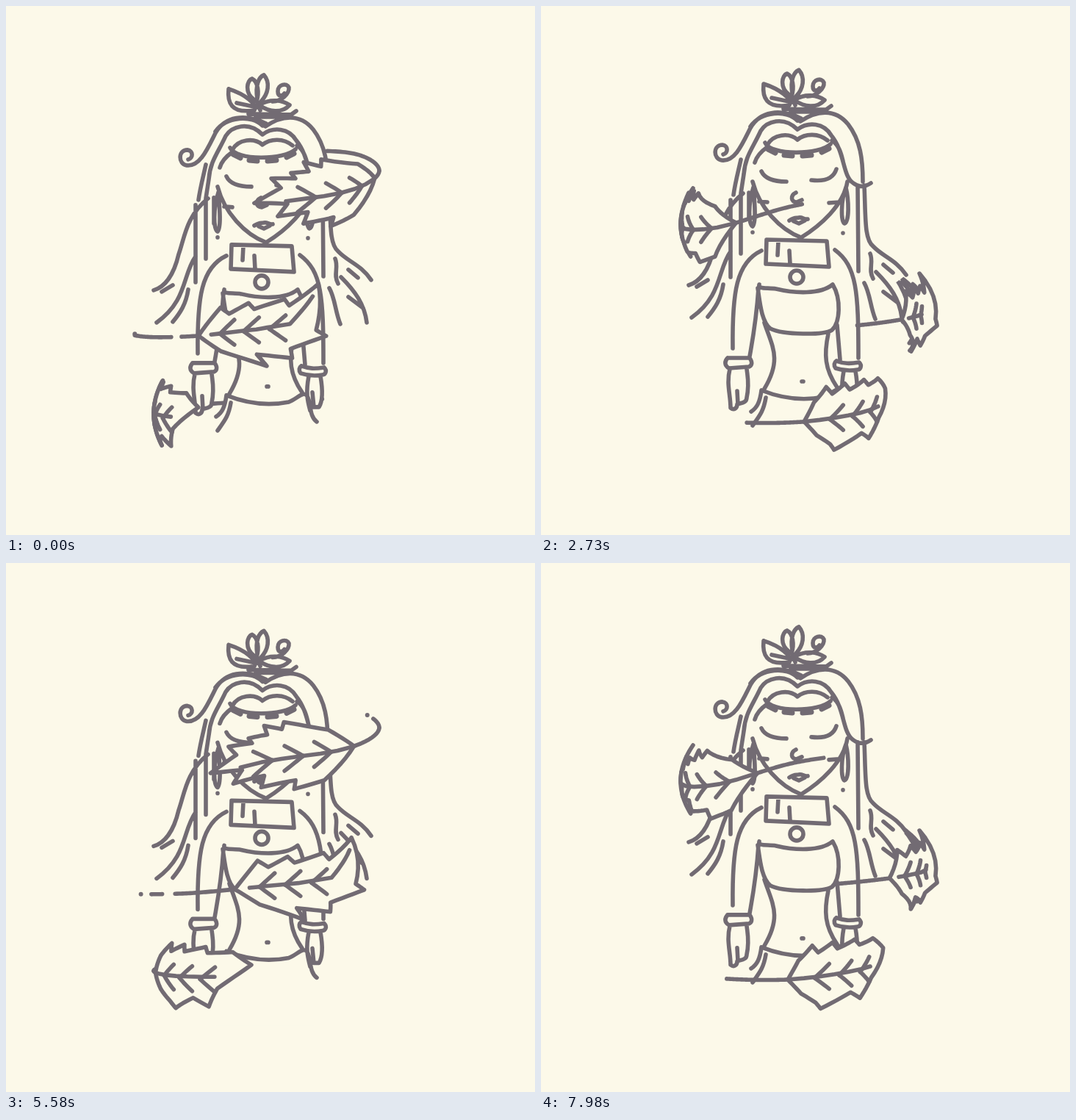
Animation of 720x720 px, one loop 8 s. Source, as an HTML page with a canvas:

```html
<!DOCTYPE html>
<html lang="en">
<head>
<meta charset="utf-8">
<title>Leaves around a figure</title>
<style>
html, body { margin: 0; width: 100%; height: 100%; overflow: hidden; background: #fcf9e9; }
canvas { display: block; width: 720px; height: 720px; }
</style>
</head>
<body>
<canvas id="stage" width="720" height="720"></canvas>
<script>
const ctx = document.getElementById('stage').getContext('2d');
const PAPER = '#fcf9e9', INK = '#726b73';
const LOOP = 8000, TURN = 1770, STEP = 30, RAD = Math.PI / 180;
const clamp = (x, lo, hi) => Math.min(hi, Math.max(lo, x));

const silhouette = new Path2D(`M350 142C300 140 280 170 268 215L262 258C240 290 238 330 225 370
  L236 404L256 365L261 400L261 470L252 484L254 500L258 548L280 536L284 495L290 470L305 520L300 526
  L290 570L285 625L420 625L412 543L427 540L431 498L437 490L432 470L432 405L440 385L452 420L466 390
  L497 367L455 330L440 240C440 190 420 140 350 142Z`);

const flower = `M303 107C301 125 306 141 338 136C343 128 325 114 303 107
  M338 122C324 112 328 95 335 93C343 97 345 112 341 124M342 120C339 102 344 91 351 88C360 98 357 114 347 124
  M346 128C360 120 376 122 386 129C375 141 358 138 346 130M363 124C375 124 386 113 385 105C382 98 370 101 370 110
  C370 118 376 117 379 113M314 126L342 132M341 122L346 136M330 141L388 142L395 137M340 145L374 145`;

const hair = `M354 154C325 140 298 144 285 167C274 189 264 213 246 211C234 209 234 190 247 190C255 191 255 201 248 203
  M335 148L353 158C375 143 400 140 418 162C435 184 438 210 438 240
  M349 169C330 150 307 158 299 171C288 195 278 205 276 230L272 256
  M349 169C364 158 385 160 395 177C414 200 410 232 425 242C434 249 443 246 449 242
  M349 183C338 173 316 175 308 190M349 183C360 174 378 174 390 184M396 184C406 190 409 204 411 212
  M272 210C268 228 264 243 262 258M285 165C300 144 335 142 349 157
  M275 256C245 280 243 310 235 332C228 362 215 377 201 381M227 374L212 383
  M258 265L258 370M272 256L272 338M258 335C240 360 247 395 205 425M248 380C245 400 237 412 227 424
  M431 245L432 362M440 245C442 290 440 318 452 328C465 342 483 346 497 367M448 338C453 350 445 360 452 372
  M466 353L479 364M456 363C475 382 488 400 491 425M466 390L486 405M440 378C448 392 448 410 455 427`;

const face = `M305 187C313 205 379 204 394 189M308 193C298 200 293 207 291 214M288 240C297 275 325 305 354 316
  C380 300 412 272 417 240M300 226C305 237 319 240 334 240M368 238C385 240 398 236 402 223
  M347 255C339 259 340 268 348 268L355 265M338 293C345 288 348 290 351 289C356 288 358 292 363 291
  M344 294L351 297L359 293M297 267L308 268M392 269L406 268M283 255L283 290
  M289 248C282 270 282 298 288 301C293 296 291 270 289 248M415 248C408 265 408 295 413 297C420 295 419 265 415 248
  M288 309L288 309M411 310L411 310`;

const torso = `M307 319L389 321L392 356L306 352ZM323 321L322 340M338 334L339 352
  M357 370A9 9 0 1 1 339 370A9 9 0 1 1 357 370
  M300 334C266 350 260 390 261 467M296 385C293 430 288 455 284 478M400 333C430 355 432 390 432 480M403 435L407 482
  M297 380C295 387 308 384 320 386C345 392 380 394 397 380C409 400 407 432 396 442C385 449 330 449 312 440
  C300 430 298 405 295 385M304 432C315 465 328 482 304 522M391 447C385 475 386 495 403 520
  M355 512L357 512M300 524C320 532 350 540 385 533C396 529 405 517 410 525C416 535 412 552 423 560
  M306 534C303 552 298 558 288 572M300 524C298 540 294 548 286 553
  M254 480L284 480C289 487 286 491 283 492L256 494C249 490 250 484 254 480
  M402 484C413 488 420 488 433 486C438 491 434 496 431 496C420 498 410 497 401 494C398 490 399 486 402 484
  M257 495C252 515 258 530 258 548C263 552 267 548 267 543C273 541 280 541 280 534C284 515 281 505 280 495M267 525L268 543
  M412 498C408 520 410 530 414 545M428 498C431 515 432 530 426 540L419 540L417 520`;

const figure = new Path2D(flower + hair + face + torso);
const band = new Path2D('M309 196L319 201M331 204L342 205M356 205L368 204M382 200L392 195');

// keys: [ms, stalk joint angle]; level: ring height every 45deg from -90;
// outline: leaf edge as [along, across] from joint round the tip and back.
const veins = [.2, .4, .6].flatMap(u => [[[u, 0], [u + .12, -17]], [[u, 0], [u + .12, 17]]]);
const leaves = [
  {
    cx: 349, r: 159, flare: 0, dir: -1, len: 78, rest: -20, stem: 33, grow: 46, dot: true,
    keys: [[0, 74], [120, 65], [900, -20], [1110, -73]],
    level: [297, 302, 271, 253, 224, 199, 205, 250],
    rib: [[.02, 0], [.8, 0]],
    outline: [[0, 0], [.2, -30], [.51, -49], [.53, -40], [.65, -49], [.63, -36], [.755, -37], [.73, -29],
      [.89, -34], [.83, -19], [1, -5], [.79, 4], [.85, 19], [.65, 19], [.67, 34], [.44, 32], [.44, 44], [.22, 38]]
  },
  {
    cx: 355, r: 158, flare: 28, dir: 1, len: 62, rest: 49, stem: 35, grow: 28, dot: true, gap: [-54, -48],
    keys: [[0, -36], [120, -28], [900, 49], [1110, 97]],
    level: [448, 450, 440, 430, 420, 414, 418, 430],
    rib: [[.12, 0], [.5, -1], [.75, -5], [.93, -40]],
    outline: [[0, 0], [.18, -36], [.27, -26], [.43, -38], [.48, -29], [.72, -39], [.75, -30], [1, -56],
      [.93, 6], [1, 15], [.76, 29], [.78, 42], [.5, 33], [.58, 50], [.2, 24]]
  },
  {
    cx: 336, r: 135, flare: 0, dir: 1, len: 78, rest: 39, stem: 28, grow: 45, dot: false,
    keys: [[0, -112], [120, -97], [900, 0], [1110, 39]],
    level: [555, 565, 567, 557, 540, 535, 538, 545],
    rib: [[0, 0], [.72, -4]],
    outline: [[0, 0], [.08, -25], [.2, -44], [.24, -34], [.38, -45], [.41, -36], [.61, -44], [.64, -36],
      [.85, -38], [1, -20], [.74, 12], [.65, 37], [.52, 26], [.27, 43], [.22, 34], [.1, 20]]
  }
];

// Monotone cubic through the keys; each turn adds a full circle.
function jointAngle(leaf, t) {
  const n = leaf.keys.length;
  const at = i => {
    const lap = Math.floor(i / n), [ms, a] = leaf.keys[i - lap * n];
    return [ms + lap * TURN, a + lap * 360 * leaf.dir];
  };
  const slope = i => (at(i + 1)[1] - at(i)[1]) / (at(i + 1)[0] - at(i)[0]);
  const tangent = i => 2 / (1 / slope(i - 1) + 1 / slope(i));
  let i = n - 1;
  while (at(i)[0] > t) i--;
  const [t0, a0] = at(i), [t1, a1] = at(i + 1), h = t1 - t0, s = (t - t0) / h;
  return a0 + (a1 - a0) * s * s * (3 - 2 * s) +
    h * s * (1 - s) * ((1 - s) * tangent(i) - s * tangent(i + 1));
}

function ringY(level, angle) {
  const x = (angle + 90) / 45, i = Math.floor(x), s = x - i;
  const p = k => level[(((i + k) % 8) + 8) % 8];
  const a = p(-1), b = p(0), c = p(1), d = p(2);
  return b + s * (c - a + s * (2 * a - 5 * b + 4 * c - d + s * (3 * (b - c) + d - a))) / 2;
}

function project(leaf, angle, u, v) {
  const cos = Math.cos(angle * RAD);
  const r = (leaf.r + leaf.flare * u * u * clamp(1 + 1.6 * cos, 0, 1)) * (1 - (v / 150) ** 2);
  return [leaf.cx + r * Math.sin(angle * RAD), ringY(leaf.level, angle) + v];
}

function subdivide(points, closed) {
  const out = [];
  for (let i = 0; i < points.length - (closed ? 0 : 1); i++) {
    const a = points[i], b = points[(i + 1) % points.length];
    for (let k = 0; k < 6; k++) out.push([a[0] + (b[0] - a[0]) * k / 6, a[1] + (b[1] - a[1]) * k / 6]);
  }
  if (!closed) out.push(points[points.length - 1]);
  return out;
}

function strokeRuns(points, visible) {
  ctx.beginPath();
  let pen = false;
  for (const p of points) {
    if (visible(p)) {
      if (pen) ctx.lineTo(p.x, p.y); else ctx.moveTo(p.x, p.y);
      pen = true;
    } else pen = false;
  }
  ctx.stroke();
}

function drawLeaf(leaf, t, front) {
  let joint = jointAngle(leaf, t);
  const mid = front ? 0 : 180;
  const centre = joint + leaf.dir * leaf.len / 2;
  joint += 360 * Math.round((mid - centre) / 360);
  const angleAt = u => joint + leaf.dir * leaf.len * u;
  const facing = a => (Math.cos(a * RAD) >= 0) === front;

  const reach = leaf.stem + leaf.grow * (1 - Math.cos((joint - leaf.rest) * RAD));
  const stem = [];
  for (let k = 0; k <= 50; k++) {
    const a = joint - leaf.dir * reach * k / 50;
    const [x, y] = project(leaf, a, -k / 50, 0);
    stem.push({ a, x, y, k });
  }
  const inGap = a => leaf.gap && a > leaf.gap[0] && a < leaf.gap[1];
  const dotted = leaf.dot && reach > 45;
  strokeRuns(stem, p => facing(p.a) && !inGap(p.a) && (!dotted || p.k < 45));
  if (dotted && facing(stem[50].a)) {
    ctx.beginPath();
    ctx.arc(stem[50].x, stem[50].y, 3, 0, 7);
    ctx.fillStyle = INK;
    ctx.fill();
  }

  const edge = subdivide(leaf.outline, true);
  if (!edge.some(([u]) => facing(angleAt(u)))) return;
  ctx.beginPath();
  for (const [u, v] of edge) {
    ctx.lineTo(...project(leaf, clamp(angleAt(u), mid - 90, mid + 90), u, v));
  }
  ctx.closePath();
  ctx.fillStyle = PAPER;
  ctx.fill();
  ctx.stroke();

  for (const line of [leaf.rib, ...veins]) {
    const points = subdivide(line, false).map(([u, v]) => {
      const a = angleAt(u), [x, y] = project(leaf, a, u, v);
      return { a, x, y };
    });
    strokeRuns(points, p => facing(p.a));
  }
}

function drawFigure(t) {
  ctx.save();
  ctx.translate(0, 2.4 + 3.5 * Math.cos(2 * Math.PI * t / TURN));
  ctx.fillStyle = PAPER;
  ctx.fill(silhouette);
  ctx.stroke(figure);
  ctx.lineWidth = 7;
  ctx.stroke(band);
  ctx.restore();
}

function draw(now) {
  const t = Math.floor(now % LOOP / STEP) * STEP % TURN;
  ctx.fillStyle = PAPER;
  ctx.fillRect(0, 0, 720, 720);
  ctx.strokeStyle = INK;
  ctx.lineWidth = 5.6;
  ctx.lineCap = ctx.lineJoin = 'round';
  for (const leaf of leaves) drawLeaf(leaf, t, false);
  drawFigure(t);
  for (const leaf of leaves) drawLeaf(leaf, t, true);
}

let start;
function tick(now) {
  start ??= now;
  draw(now - start);
  requestAnimationFrame(tick);
}
draw(0);
requestAnimationFrame(tick);
</script>
</body>
</html>
```
